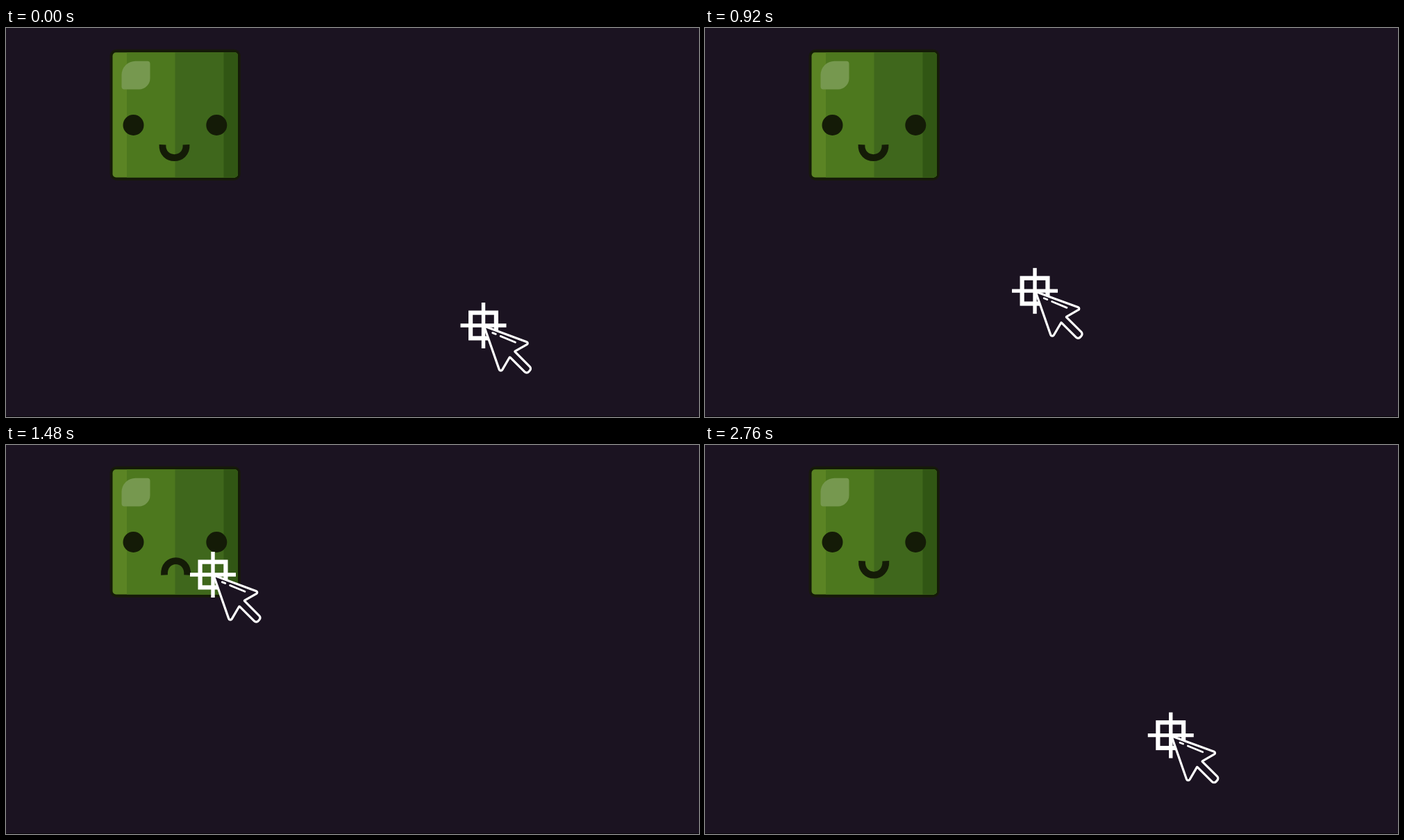
These frames come from a looping animation (998 by 561 pixels, 2.8 s). An HTML page with a canvas:

```html
<!DOCTYPE html>
<html lang="en">
<head>
<meta charset="utf-8">
<title>Cursor and cube</title>
<style>
  html, body { margin: 0; width: 100%; height: 100%; overflow: hidden; background: #1b1321; }
  canvas { display: block; width: 100%; height: 100%; }
</style>
</head>
<body>
<canvas id="stage" width="998" height="561"></canvas>
<script>
const ctx = document.getElementById('stage').getContext('2d');
const LOOP = 2800, STEP = 40;
const BG = '#1b1321', INK = '#141b07', WHITE = '#fff';

const lerp = (a, b, t) => a + (b - a) * t;
const mix = (a, b, t) => a.map((v, i) => lerp(v, b[i], t));
const progress = (t, from, to) => Math.min(1, Math.max(0, (t - from) / (to - from)));
const smooth = p => p * p * (3 - 2 * p);
const cubic = (a, b, c, d, u) => {
  const v = 1 - u;
  return a * v * v * v + 3 * b * u * v * v + 3 * c * u * u * v + d * u * u * u;
};

// Timing curve with flat ends and handles at x1 and x2
function ease(p, x1, x2) {
  let lo = 0, hi = 1;
  for (let i = 0; i < 24; i++) {
    const mid = (lo + hi) / 2;
    if (cubic(0, x1, x2, 1, mid) < p) lo = mid; else hi = mid;
  }
  return smooth((lo + hi) / 2);
}

// Cursor path, walked by arc length
const HOME = [687.5, 429], HIT = [298, 187];
const CURVE = [HOME, [359, 376.5], [355.7, 311], HIT];
const SAMPLES = 200;
const pointAt = u => [0, 1].map(k => cubic(...CURVE.map(p => p[k]), u));
const lengths = [0];
for (let i = 1; i <= SAMPLES; i++) {
  const [x0, y0] = pointAt((i - 1) / SAMPLES), [x1, y1] = pointAt(i / SAMPLES);
  lengths.push(lengths[i - 1] + Math.hypot(x1 - x0, y1 - y0));
}

function alongCurve(f) {
  const goal = f * lengths[SAMPLES];
  let i = 1;
  while (i < SAMPLES && lengths[i] < goal) i++;
  const part = (goal - lengths[i - 1]) / (lengths[i] - lengths[i - 1]);
  return pointAt((i - 1 + part) / SAMPLES);
}

function cursorAt(t) {
  if (t <= 600) return HOME;
  if (t < 1480) return alongCurve(ease(progress(t, 600, 1480), 0.167, 0.57));
  return mix(HIT, HOME, smooth(progress(t, 2480, 2800)));
}

// Mouth poses: left x, right x, end y, handle dx, handle dy
const SMILE = [225.5, 259.5, 168.3, -1.5, 25];
const GRIN = [226, 260.3, 167.3, -1.5, 27];
const FLAT = [217, 270.4, 177.8, 12.3, -2];
const FROWN = [228, 261.2, 187.5, -1.5, -27.3];

const morph = (a, b, p) =>
  p < 0.5 ? mix(a, FLAT, p * 2) : mix(FLAT, b, p * 2 - 1);

const mouthAt = t => t < 2000
  ? morph(SMILE, FROWN, progress(t, 1040, 1360))
  : morph(FROWN, GRIN, progress(t, 2520, 2760));

function fillBox(color, x, y, w, h, r) {
  ctx.fillStyle = color;
  ctx.beginPath();
  ctx.roundRect(x, y, w, h, r);
  ctx.fill();
}

function drawCube(mouth) {
  fillBox('#19180f', 149.5, 30.5, 188.5, 189.5, 10);
  fillBox(INK, 151, 32, 185.5, 186.5, 8);
  ctx.save();
  ctx.beginPath();
  ctx.roundRect(153.5, 35.3, 180.5, 180.2, 5);
  ctx.clip();
  const stripes = [[153, '#5b8424'], [174, '#4d781e'], [243.5, '#3f671c'], [313.5, '#315614']];
  for (const [x, color] of stripes) {
    ctx.fillStyle = color;
    ctx.fillRect(x, 35, 335 - x, 181);
  }
  ctx.restore();
  fillBox('#76984f', 166.5, 47.7, 41, 40.8, [20, 4, 16, 4]);

  ctx.fillStyle = INK;
  for (const x of [183.5, 303.3]) {
    ctx.beginPath();
    ctx.arc(x, 140, 15, 0, Math.PI * 2);
    ctx.fill();
  }

  const [left, right, y, dx, dy] = mouth;
  ctx.strokeStyle = INK;
  ctx.lineWidth = 9.8;
  ctx.lineCap = 'butt';
  ctx.beginPath();
  ctx.moveTo(left, y);
  ctx.bezierCurveTo(left + dx, y + dy, right - dx, y + dy, right, y);
  ctx.stroke();
}

function line(x0, y0, x1, y1) {
  ctx.beginPath();
  ctx.moveTo(x0, y0);
  ctx.lineTo(x1, y1);
  ctx.stroke();
}

// Arrow corners: x, y, corner radius
const ARROW = [
  [66.5, 25.2, 2], [45, 37.5, 0.5], [69.5, 62, 4], [62.5, 70, 4],
  [38, 45.5, 0.5], [24.5, 68.5, 2.5], [1, 1, 0.5]
];

function drawCursor([x, y]) {
  ctx.save();
  ctx.translate(x, y);
  ctx.strokeStyle = WHITE;
  ctx.lineCap = 'butt';
  ctx.lineWidth = 5.4;
  line(-33, 0, 33, 0);
  line(0, -33, 0, 33);
  ctx.lineWidth = 6.2;
  ctx.strokeRect(-18.4, -18.4, 36.8, 36.8);

  ctx.lineWidth = 3.2;
  ctx.lineCap = ctx.lineJoin = 'round';
  ctx.fillStyle = BG;
  ctx.beginPath();
  ctx.moveTo(20, 8.1);
  ARROW.forEach(([ax, ay, r], i) => {
    const [bx, by] = ARROW[(i + 1) % ARROW.length];
    ctx.arcTo(ax, ay, bx, by, r);
  });
  ctx.closePath();
  ctx.fill();
  ctx.stroke();

  ctx.lineWidth = 2.8;
  line(13.2, 10.6, 17.8, 12.4);
  line(24.6, 15.4, 46, 24.2);
  ctx.restore();
}

function draw(t) {
  ctx.fillStyle = BG;
  ctx.fillRect(0, 0, 998, 561);
  ctx.fillStyle = '#08060a';
  ctx.fillRect(0, 560, 998, 1);
  drawCube(mouthAt(t));
  drawCursor(cursorAt(t));
}

let start;
function tick(now) {
  start ??= now;
  const t = (now - start) % LOOP;
  draw(Math.floor(t / STEP) * STEP);
  requestAnimationFrame(tick);
}
draw(0);
requestAnimationFrame(tick);
</script>
</body>
</html>
```
